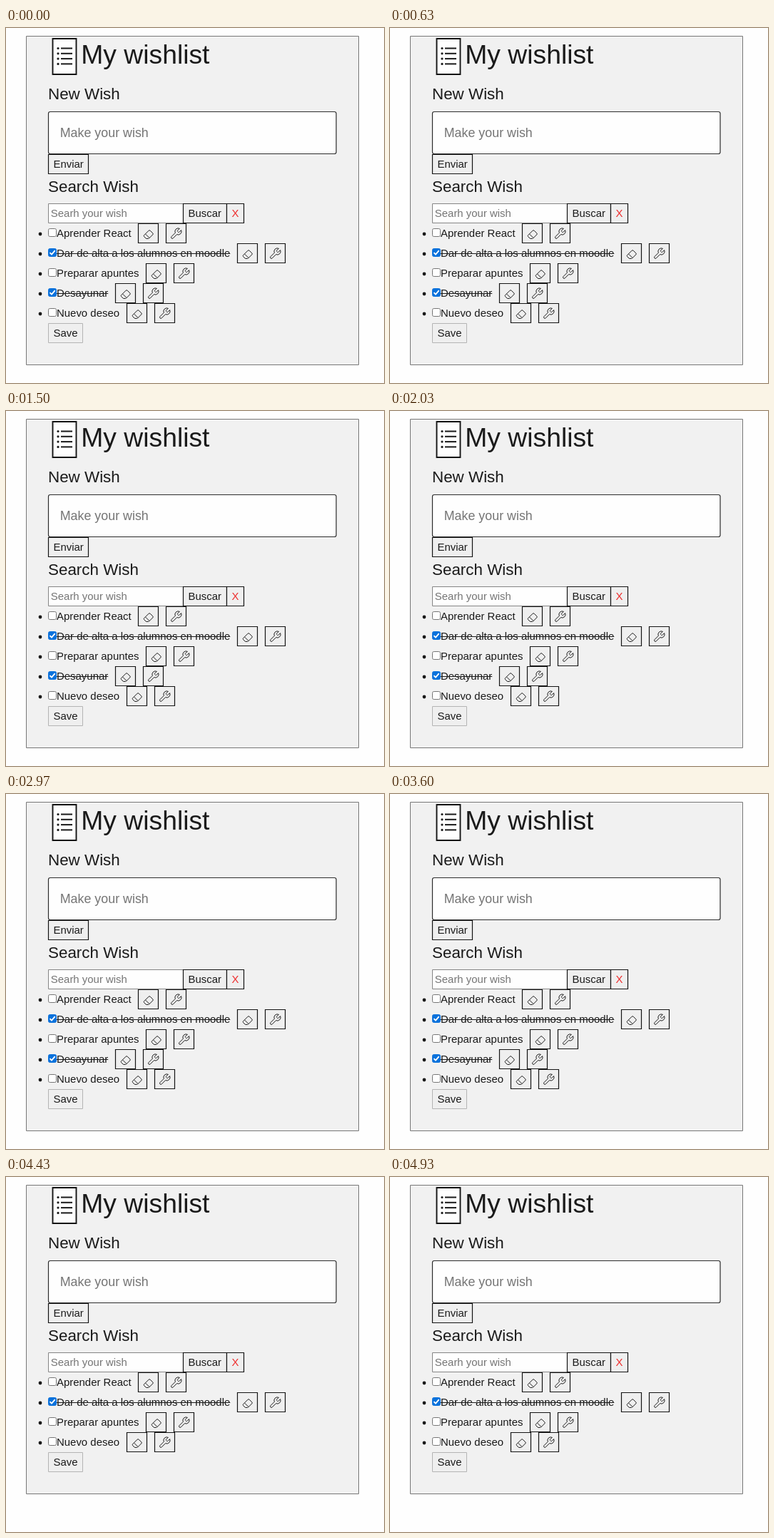
Recreate the animation shown at these times as an HTML page with a canvas. Size 530 px wide and 498 px high, loop 4960 ms.

```html
<!DOCTYPE html>
<html lang="es">
<head>
<meta charset="utf-8">
<title>My wishlist</title>
<style>
  html, body { margin: 0; width: 100%; height: 100%; overflow: hidden; background: #fefefe; }
  canvas { display: block; }
</style>
</head>
<body>
<canvas id="stage" width="530" height="498"></canvas>
<script>
const ctx = document.getElementById('stage').getContext('2d');
const LOOP = 4960, DELETE_AT = 3830;
const FONT = '"Liberation Sans", Arial, sans-serif';
const PAGE = '#fefefe', PANEL = '#f1f1f1', BUTTON = '#efefef';
const INK = '#1a1a1a', EDGE = '#141414', HINT = '#757575';
const ROW = 28;

const wishes = [
  { text: 'Aprender React', x: 185 },
  { text: 'Dar de alta a los alumnos en moodle', x: 324, done: true },
  { text: 'Preparar apuntes', x: 196 },
  { text: 'Desayunar', x: 153, done: true, deleted: true },
  { text: 'Nuevo deseo', x: 169 }
];

const eraser = new Path2D('M8.44 2.56a1.5 1.5 0 0 1 2.12 0l3.88 3.88a1.5 1.5 0 0 1 0 2.12l-5.5 5.5a1.5 1.5 0 0 1-1.06.44H5.12a1.5 1.5 0 0 1-1.06-.44l-2.5-2.5a1.5 1.5 0 0 1 0-2.12zM3.8 7.9l5.3 5.3');
const wrench = new Path2D('M14.7 6.3a1 1 0 0 0 0 1.4l1.6 1.6a1 1 0 0 0 1.4 0l3.77-3.77a6 6 0 0 1-7.94 7.94l-6.91 6.91a2.12 2.12 0 0 1-3-3l6.91-6.91a6 6 0 0 1 7.94-7.94l-3.76 3.76z');

function text(str, x, y, size = 14.94, color = INK) {
  ctx.font = `${size}px ${FONT}`;
  ctx.fillStyle = color;
  ctx.fillText(str, x, y);
}

function box(x, y, w, h, fill, stroke, line = 1, radius = 0) {
  ctx.beginPath();
  ctx.roundRect(x + 0.5, y + 0.5, w - 1, h - 1, radius);
  ctx.fillStyle = fill;
  ctx.fill();
  ctx.strokeStyle = stroke;
  ctx.lineWidth = line;
  ctx.stroke();
}

function button(x, y, w, label = '', color = INK, border = EDGE, line = 1.2) {
  box(x, y, w, 28, BUTTON, border, line);
  text(label, x + 7.5, y + 19.3, 14.94, color);
}

function icon(path, x, y, scale) {
  ctx.save();
  ctx.translate(x, y);
  ctx.scale(scale, scale);
  ctx.lineWidth = 1 / scale;
  ctx.lineJoin = 'round';
  ctx.strokeStyle = INK;
  ctx.stroke(path);
  ctx.restore();
}

function dot(x, y, r) {
  ctx.beginPath();
  ctx.arc(x, y, r, 0, Math.PI * 2);
  ctx.fillStyle = INK;
  ctx.fill();
}

function checkbox(y, done) {
  const edge = done ? '#0b72dc' : '#767676';
  box(59, y, 12, 12, done ? edge : PAGE, edge, 1, 2);
  if (!done) return;
  ctx.beginPath();
  ctx.moveTo(61.5, y + 6.2);
  ctx.lineTo(64, y + 8.7);
  ctx.lineTo(68.7, y + 3.2);
  ctx.strokeStyle = '#fff';
  ctx.lineWidth = 1.8;
  ctx.stroke();
}

function wishRow(wish, y) {
  dot(48, y + 15, 2.4);
  checkbox(y + 7, wish.done);
  text(wish.text, 71, y + 19.3);
  if (wish.done) ctx.fillRect(71, y + 14, ctx.measureText(wish.text).width, 1);
  button(wish.x, y, 29);
  icon(eraser, wish.x + 7.2, y + 7.8, 0.94);
  button(wish.x + 39, y, 29);
  icon(wrench, wish.x + 44.3, y + 5.4, 0.76);
}

function heading() {
  box(65, 14.5, 34, 51, PAGE, EDGE, 1.9);
  for (let y = 27.5; y < 52; y += 7.3) {
    dot(73, y + 1, 1.6);
    ctx.fillRect(77, y, 16, 2);
  }
  text('My wishlist', 105.2, 50.4, 37.3);
}

function draw(t) {
  const list = wishes.filter(w => !(w.deleted && t >= DELETE_AT));
  const listEnd = 274 + list.length * ROW;

  ctx.fillStyle = PAGE;
  ctx.fillRect(0, 0, 530, 498);
  box(28, 11, 467, listEnd + 48, PANEL, '#777777');

  heading();
  text('New Wish', 59, 100, 22.4);
  box(59, 117, 404.5, 60, PAGE, '#2c2c2c', 1.2, 2.5);
  text('Make your wish', 75.7, 152.5, 17.86, HINT);
  button(59, 177, 57, 'Enviar');

  text('Search Wish', 59, 230, 22.4);
  box(59, 246, 190, 28, PAGE, '#858585');
  text('Searh your wish', 62.8, 265, 14.94, HINT);
  button(248, 246, 62, 'Buscar');
  button(309, 246, 25, 'X', '#ee2c2c');

  list.forEach((wish, i) => wishRow(wish, 274 + i * ROW));
  button(59, listEnd, 49, 'Save', INK, '#b4b4b4', 1);
}

const start = performance.now();
function tick(now) {
  draw(Math.max(0, now - start) % LOOP);
  requestAnimationFrame(tick);
}
draw(0);
requestAnimationFrame(tick);
</script>
</body>
</html>
```
